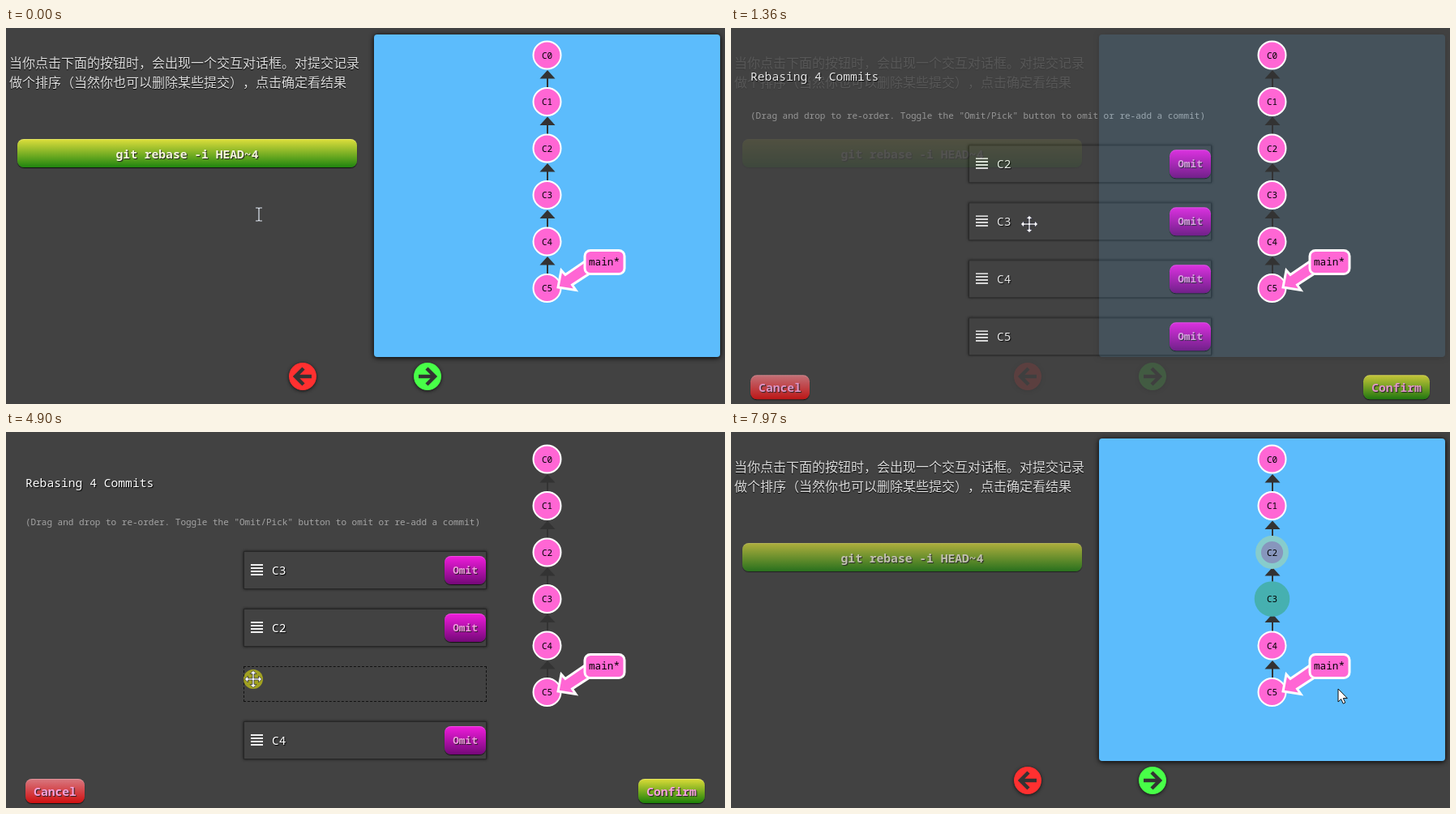
Recreate the animation shown at these times as an HTML page. Size 887 px wide and 464 px high, loop 8000 ms.

```html
<!DOCTYPE html>
<html lang="zh-CN">
<head>
<meta charset="utf-8">
<title>Interactive rebase</title>
<style>
html, body { margin: 0; width: 100%; height: 100%; overflow: hidden; background: #424242; }
body { position: relative; font: 14.667px/20px "Noto Sans Mono", monospace; color: #fff; }
body *, svg { box-sizing: border-box; }
.abs, svg { position: absolute; white-space: pre; }
svg { left: 0; top: 0; }
.intro { left: 4px; top: 30px; font: 300 16px/24px "Noto Sans CJK SC", "Noto Sans CJK", sans-serif;
  text-spacing-trim: space-all; color: #ddd; text-shadow: 0 1px 1px #000; }
.button { text-align: center; font-weight: 600; border-radius: 8px; text-shadow: 1px 1px 1px #222;
  box-shadow: 0 1px 1px #111, inset 0 1px 0 #fff3; }
.git { left: 14px; top: 137px; width: 419px; height: 35px; line-height: 36px; color: #f6f6dc;
  background: linear-gradient(#dede3c, #1f850f); }
.pane { left: 454px; top: 8px; width: 427px; height: 398px; border-radius: 4px; background: #5cbcfc;
  box-shadow: 0 1px 6px #000; }
#modal { inset: 0; }
.backdrop { inset: 0; background: #0009; }
#dialog { left: 0; top: 0; width: 100%; height: 492px; background: #424242; box-shadow: 0 0 30px #0008; }
.note { left: 24px; top: 101px; font-size: 11px; color: #a4a4a4; }
.row { left: 293px; width: 300px; height: 47px; border: 1px solid #272727; box-shadow: 0 0 3px #111;
  font-weight: 500; text-shadow: 1px 1px 1px #000; }
.row .name { left: 34px; top: 12px; }
.row i { left: 8px; top: 15px; width: 15px; height: 14px;
  background: repeating-linear-gradient(#eee 0 2px, transparent 2px 4px); }
.omit { left: 247px; top: 5px; width: 51px; height: 35px; font-size: 12.8px; line-height: 35px; color: #f29ae0;
  background: linear-gradient(#f01cdc, #740878); }
.slot { left: 293px; width: 300px; height: 44px; border: 1px dashed #111; }
.action { height: 30px; line-height: 31px; color: #f8a2dc; }
.cancel { left: 24px; width: 73px; background: linear-gradient(#d87880, #d01010); }
.confirm { left: 780px; width: 82px; background: linear-gradient(#dcdc38, #1c8008); }
</style>
</head>
<body>
<div class="abs intro">当你点击下面的按钮时，会出现一个交互对话框。对提交记录
做个排序（当然你也可以删除某些提交），点击确定看结果</div>
<div class="abs button git" id="git">git rebase -i HEAD~4</div>
<div class="abs pane"></div>
<svg width="887" height="464" style="filter:drop-shadow(0 1px 2px #111)">
  <circle cx="366" cy="430" r="17" fill="#ff3030"/>
  <circle cx="520" cy="430" r="17" fill="#48ff48"/>
  <path d="M377 430H358M367 420L357 430L367 440M509 430H528M519 420L529 430L519 440"
    fill="none" stroke="#333" stroke-width="4.5"/>
</svg>
<div class="abs" id="modal">
  <div class="abs backdrop"></div>
  <div class="abs" id="dialog">
    <div class="abs" style="left:24px;top:52px;font-weight:500;text-shadow:1px 1px 1px #000">Rebasing 4 Commits</div>
    <div class="abs note">(Drag and drop to re-order. Toggle the "Omit/Pick" button to omit or re-add a commit)</div>
    <div class="abs slot"></div>
    <div class="abs button action cancel">Cancel</div>
    <div class="abs button action confirm">Confirm</div>
  </div>
</div>
<svg id="graph" width="887" height="464"></svg>
<svg width="887" height="464">
  <g id="cursor" stroke-linejoin="round">
    <circle id="press" r="12" fill="#ff0" opacity=".5"/>
    <path id="ibeam" d="M-4 -8H-1L0 -7L1 -8H4M0 -7V7M-4 8H-1L0 7L1 8H4" fill="none" stroke="#dde4ee" stroke-width="1.2"/>
    <path id="arrow" d="M0 0V16L3.7 12.6L6.2 18.2L8.8 17L6.3 11.6H11.3Z" fill="#fff" stroke="#111"/>
    <path id="move" d="M0 -10.5L4 -6.5H1V-1H6.5V-4L10.5 0L6.5 4V1H1V6.5H4L0 10.5L-4 6.5H-1V1H-6.5V4L-10.5 0L-6.5 -4V-1H-1V-6.5H-4Z"
      fill="#fff" stroke="#223" stroke-width=".7"/>
  </g>
</svg>
<script>
const LOOP = 8000, PINK = [255, 102, 212], TEAL = [70, 176, 176], WHITE = [255, 255, 255];
const $ = id => document.getElementById(id);
const clamp = v => Math.max(0, Math.min(1, v));
const progress = (t, start, length) => clamp((t - start) / length);
const mix = (a, b, p) => `rgb(${a.map((v, i) => Math.round(v + (b[i] - v) * p))})`;
const within = (t, ranges) => ranges.some(([from, to]) => t >= from && t < to);

const nodeY = i => 33.5 + 57.5 * i;
const label = (x, y, size, weight, text) =>
  `<text x="${x}" y="${y}" font-size="${size}" font-weight="${weight}" text-anchor="middle" fill="#000">${text}</text>`;

function buildGraph() {
  let arrows = '', nodes = '';
  for (let i = 0; i < 6; i++) {
    const y = nodeY(i);
    if (i) arrows += `<path d="M668 ${y - 17}V${y - 30}" stroke="#333" stroke-width="2"/>
      <path d="M668 ${y - 39}L677.5 ${y - 28.5}H658.5Z" fill="#333"/>`;
    nodes += `<circle class="node" cx="667.5" cy="${y}" r="17"/>` + label(667.5, y + 4, 11, 500, 'C' + i);
  }
  $('graph').innerHTML = arrows + nodes + `<g fill="${mix(PINK, PINK, 0)}" stroke="#fff" stroke-width="3">
    <path d="M681 320L685 299L690 304.5L717 286L726 299L698.5 317L703 323.5Z"/>
    <rect x="714" y="274.5" width="49" height="29" rx="7"/></g>` + label(738, 293, 12.7, 400, 'main*');
}

function buildRows() {
  for (let i = 2; i < 6; i++) {
    $('dialog').insertAdjacentHTML('beforeend', `<div class="abs row"><i class="abs"></i>
      <span class="abs name">C${i}</span><div class="abs button omit">Omit</div></div>`);
  }
}

buildGraph();
buildRows();
const nodes = document.querySelectorAll('.node');
const rows = document.querySelectorAll('.row');
const slot = document.querySelector('.slot');
const actions = document.querySelectorAll('.action');

// Commit order from each moment on; 0 is the empty drop slot.
const orders = [[0, '2345'], [2360, '2045'], [2720, '0245'], [3220, '3245'],
  [4090, '3240'], [4900, '3204'], [5430, '3254']];

// Pointer stops: time, x, y
const stops = [[0, 312, 230], [30, 312, 230], [40, 273, 184], [190, 273, 184], [320, 262, 156], [560, 262, 156],
  [880, 360, 238], [980, 368, 242], [1640, 368, 242], [1980, 283, 261], [2200, 303, 252], [2360, 303, 252],
  [2900, 305, 170], [3230, 305, 170], [3470, 303, 254], [4010, 304, 390], [4130, 304, 390], [4900, 305, 305],
  [5100, 305, 289], [5430, 305, 289], [5980, 746, 418], [6120, 746, 418], [6600, 820, 444], [6900, 820, 444],
  [7560, 749, 317], [LOOP, 749, 317]];

function pointerAt(t) {
  const i = stops.findIndex(s => s[0] > t);
  const [t0, x0, y0] = stops[i - 1], [t1, x1, y1] = stops[i];
  const p = (t - t0) / (t1 - t0), e = p * p * (3 - 2 * p);
  return [x0 + (x1 - x0) * e, y0 + (y1 - y0) * e];
}

function drawList(t) {
  const order = orders.filter(o => o[0] <= t).pop()[1];
  let y = 147;
  rows.forEach(row => row.style.display = 'none');
  slot.style.display = 'none';
  for (const c of order) {
    const item = +c ? rows[c - 2] : slot;
    item.style.display = 'block';
    item.style.top = y + 'px';
    y += +c ? 71 : 68;
  }
  actions.forEach(a => a.style.top = y + 'px');
  actions[1].style.filter = within(t, [[6250, 6810]]) ? 'brightness(1.08)' : '';
}

function drawModal(t) {
  const opening = progress(t, 705, 760), closing = progress(t, 6810, 770);
  const slide = Math.pow(1 - opening, 2.7) + progress(t, 6790, 121);
  $('modal').style.opacity = opening * (1 - Math.pow(closing, 2));
  $('dialog').style.transform = `translateY(${-575 * Math.min(1, slide)}px)`;
}

function drawNodes(t) {
  nodes.forEach((node, i) => {
    const p = i === 3 ? progress(t, 7110, 480) : i === 2 ? progress(t, 7660, 480) : 0;
    node.setAttribute('fill', mix(PINK, TEAL, p));
    node.setAttribute('stroke', mix(WHITE, TEAL, p));
    node.setAttribute('stroke-width', 2 + 7.5 * p);
  });
}

function drawCursor(t) {
  const kind = t < 200 ? 'ibeam' : within(t, [[1040, 1850], [2060, 5540]]) ? 'move' : 'arrow';
  for (const id of ['ibeam', 'arrow', 'move']) $(id).style.display = id === kind ? '' : 'none';
  const pressed = within(t, [[460, 560], [2360, 3220], [4090, 5430], [6640, 6810]]);
  $('press').style.display = pressed ? '' : 'none';
  $('cursor').setAttribute('transform', `translate(${pointerAt(t)})`);
}

function frame() {
  const t = performance.now() % LOOP;
  $('git').style.opacity = 1 - 0.3 * progress(t, 520, 150);
  drawModal(t);
  drawList(t);
  drawNodes(t);
  drawCursor(t);
  requestAnimationFrame(frame);
}
frame();
</script>
</body>
</html>
```
